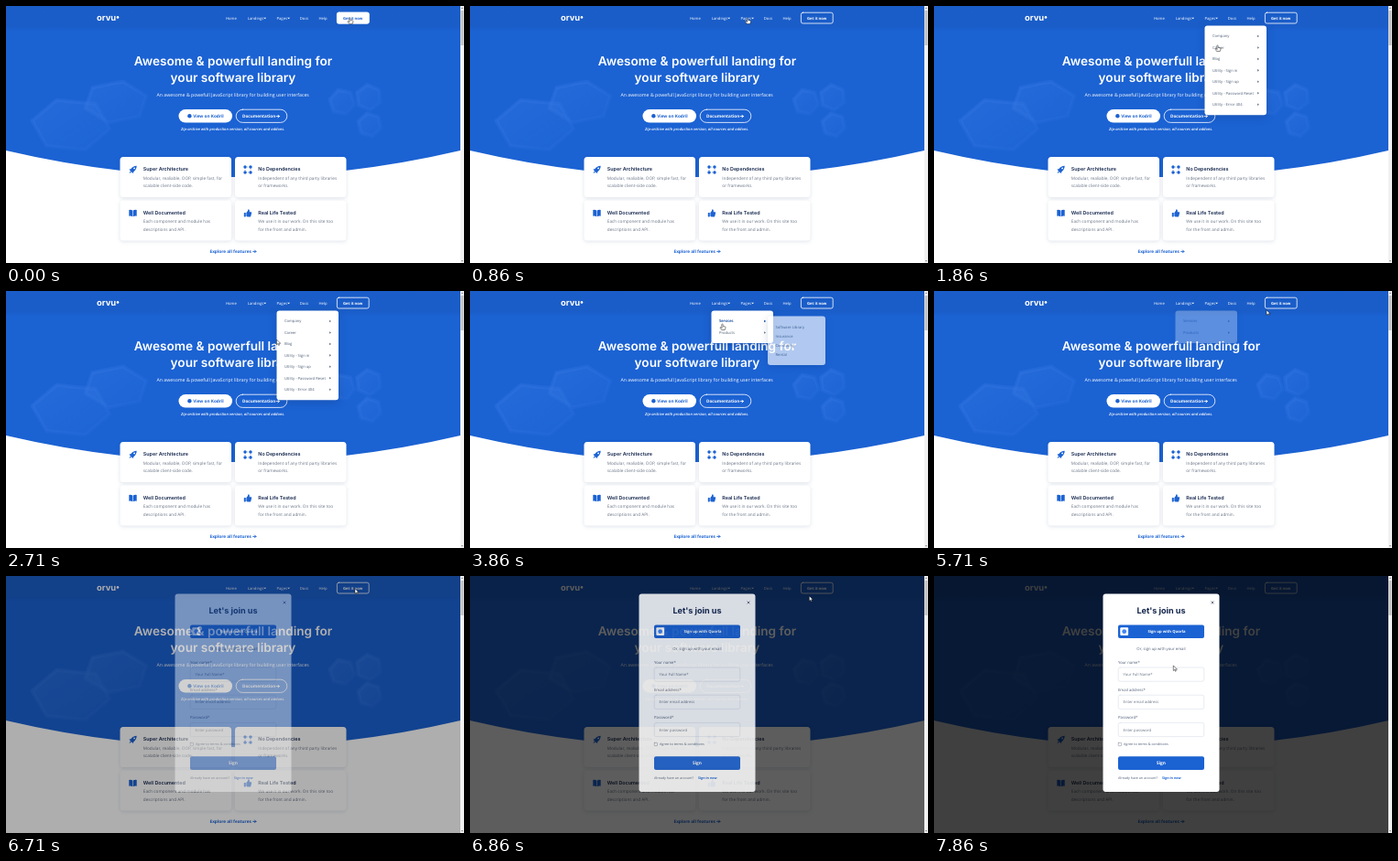
These frames come from a looping animation (500x281 px, 8 s). An HTML page:

```html
<!DOCTYPE html>
<html lang="en">
<head>
<meta charset="utf-8">
<title>Landing page tour</title>
<style>
  html, body { margin: 0; height: 100%; overflow: hidden; background: #fff; }
  svg { display: block; width: 100vw; height: 100vh; }
  text { font-family: "Open Sans", sans-serif; text-rendering: geometricPrecision; white-space: pre; }
  .head { font-family: Inter, sans-serif; font-weight: 600; }
  .bold { font-weight: 700; }
  .mid { text-anchor: middle; }
  .card { filter: drop-shadow(0 1px 2px #1b3a7026); }
  .panel { filter: drop-shadow(0 2px 4px #0b235040); }
</style>
</head>
<body>
<svg id="stage" viewBox="0 0 500 281" preserveAspectRatio="none"></svg>
<script>
const BLUE = '#1b62d3', NAVY = '#14264d', GREY = '#6a7487', MENU = '#505f78';
const LOOP = 8000, FPS = 7;

// ---------- drawing helpers (text y is the middle of the capitals) ----------
const text = (x, y, str, size, fill, cls = '', extra = '') =>
  `<text x="${x}" y="${y + size * .36}" font-size="${size}" fill="${fill}" class="${cls}" ${extra}>${str}</text>`;
const rect = (x, y, w, h, r, fill, extra = '') =>
  `<rect x="${x}" y="${y}" width="${w}" height="${h}" rx="${r}" fill="${fill}" ${extra}/>`;
const path = (d, fill, extra = '') => `<path d="${d}" fill="${fill}" ${extra}/>`;
const group = (id, body, extra = '') => `<g id="${id}" ${extra}>${body}</g>`;
const line = (color, width) => `stroke="${color}" stroke-width="${width}" stroke-linejoin="round" stroke-linecap="round"`;
const arrow = (x, y, color) => path(`M${x} ${y}h3.2m-1.4 -1.4l1.4 1.4l-1.4 1.4`, 'none', line(color, .9));

function hexagon(cx, cy, r, turn, fill, squash = 1) {
  const points = Array.from({ length: 6 }, (_, i) => {
    const a = turn + i * Math.PI / 3;
    return `${(cx + r * Math.cos(a)).toFixed(1)},${(cy + r * squash * Math.sin(a)).toFixed(1)}`;
  });
  return `<polygon points="${points.join(' ')}" fill="${fill}" ${line(fill, 4)}/>`;
}

// ---------- page ----------
function hero() {
  const deco = hexagon(71, 130, 43, .15, 'url(#shine)', .68) + hexagon(120, 105, 35, -.3, 'url(#shine)', .66) +
    hexagon(367, 105, 14, .2, 'url(#shine)') + hexagon(396, 100, 14, .4, 'url(#shine)') + hexagon(397, 130, 13, .3, 'url(#shine)');
  return path('M0 0H496V158Q248 216 0 158Z', BLUE) + `<g opacity=".55">${deco}</g>` +
    rect(0, 0, 496, 28, 0, 'url(#shade)') +
    text(99, 12.8, 'orvu', 9.4, '#fff', 'head bold') + '<circle cx="122" cy="12.4" r="1.3" fill="#fff"/>' +
    [[240, 'Home'], [263.8, 'Landings'], [295.5, 'Pages'], [320.8, 'Docs'], [341.5, 'Help']]
      .map(([x, label]) => text(x, 13, label, 4.2, '#fff')).join('') +
    [281.3, 307.2].map(x => path(`M${x} 12.7h2.8l-1.4 1.5z`, '#fff')).join('') +
    rect(361.4, 7.2, 34.8, 11.8, 2, 'none', line('#fff', .8)) + text(378.7, 13, 'Get it now', 4.2, '#fff', 'bold mid') +
    group('cta', rect(361, 6.8, 35.6, 12.6, 2.2, '#fff') + text(378.7, 13, 'Get it now', 4.2, BLUE, 'bold mid')) +
    text(248, 60, 'Awesome &amp; powerfull landing for', 13.6, '#fff', 'head mid') +
    text(248, 77.8, 'your software library', 13.6, '#fff', 'head mid') +
    text(247.7, 97.2, 'An awesome &amp; powefull JavaScript library for building user interfaces', 5.2, '#fff', 'mid') +
    rect(188.5, 113, 58.5, 14.6, 7.3, '#fff') + `<circle cx="200.4" cy="120.3" r="2.2" fill="${BLUE}"/>` +
    text(204.2, 120.4, 'View on Kodril', 4.7, BLUE, 'bold') +
    rect(251.2, 113.2, 55.6, 14.2, 7.1, 'none', line('#fff', .8)) +
    text(258, 120.4, 'Documentation', 4.65, '#fff', 'bold') + arrow(295.2, 120.6, '#fff') +
    text(247.7, 135, 'Zip-archive with production version, all sources and addons.', 4.15, '#fff', 'mid',
      'font-weight="600" font-style="italic"');
}

const icons = {
  rocket: path('M4.2 -4.2Q0 -4 -2.3 -.8L-4 -.4L-3 .9L-.9 3L.4 4L.8 2.3Q4 0 4.2 -4.2Z', BLUE) +
    path('M-2.7 1.6L-4 4L-1.6 2.7Z', BLUE) + '<circle cx="1.6" cy="-1.6" r=".9" fill="#fff"/>',
  nodes: path('M-3 -3H3V3H-3Z', 'none', `stroke="${BLUE}" stroke-width=".5" stroke-dasharray="1 1"`) +
    [[-3, -3], [3, -3], [-3, 3], [3, 3]].map(([x, y]) => `<circle cx="${x}" cy="${y}" r="1.7" fill="${BLUE}"/>`).join(''),
  book: path('M-4.2 -3.6Q-2 -4 -.3 -3V3.8Q-2 2.8 -4.2 3.2ZM4.2 -3.6Q2 -4 .3 -3V3.8Q2 2.8 4.2 3.2Z', BLUE),
  thumb: rect(-4.2, -.6, 2, 4.6, .4, BLUE) +
    path('M-1.6 -.4Q.4 -2 .4 -4.2Q2.2 -4.2 1.8 -1.2H3.8Q4.5 -.8 4 .6L3.2 3.4Q3 4 2.2 4H-.4L-1.6 3.2Z', BLUE),
};

const card = (x, y, icon, title, first, second) =>
  rect(x, y, 121.5, 44, 3.5, '#fff', 'class="card"') +
  `<g transform="translate(${x + 14} ${y + 14})">${icons[icon]}</g>` +
  text(x + 25.3, y + 13.2, title, 5.4, NAVY, 'head') +
  text(x + 25.3, y + 23, first, 4.7, GREY) + text(x + 25.3, y + 31.4, second, 4.7, GREY);

const cards = () =>
  card(124.5, 165, 'rocket', 'Super Architecture', 'Modular, realiable, OOP, simple fast, for', 'scalable client-side code.') +
  card(250, 165, 'nodes', 'No Dependencies', 'Independent of any third party libraries', 'or frameworks.') +
  card(124.5, 212.5, 'book', 'Well Documented', 'Each component and module has', 'descriptions and API.') +
  card(250, 212.5, 'thumb', 'Real Life Tested', 'We use it in our work. On this site too', 'for the front and admin.') +
  text(222.5, 268, 'Explore all features', 4.7, BLUE, 'bold') + arrow(269.7, 268.4, BLUE);

// ---------- menus ----------
const menuRow = (x, y, label, color) =>
  text(x + 8.4, y, label, 4.15, color) + path(`M${x + 57.7} ${y - 1.3}l1.7 1.3l-1.7 1.3z`, color);

const menu = (id, x, labels) => group(id,
  rect(x, 21.5, 67.5, labels.length * 12.45 + 10.5, 3, '#fff', 'class="panel"') +
  labels.map((label, i) => menuRow(x, 33 + i * 12.45, label, MENU)).join(''));

const submenu = (id, x, y, labels) => group(id,
  rect(x, y, 63, labels.length * 10.3 + 12.3, 3, '#fff', 'class="panel"') +
  labels.map((label, i) => text(x + 8.5, y + 11.6 + i * 10.3, label, 4.15, MENU)).join(''));

const menus = () =>
  menu('pages', 295.5, ['Company', 'Career', 'Blog', 'Utility - Sign in', 'Utility - Sign up',
    'Utility - Password Reset', 'Utility - Error 404']) +
  group('careerHover', menuRow(295.5, 45.45, 'Career', BLUE)) +
  submenu('careerSub', 357, 40, ['Listing', 'Opening']) +
  menu('landings', 263.5, ['Services', 'Products']) +
  group('servicesHover', menuRow(263.5, 33, 'Services', BLUE)) +
  group('productsHover', menuRow(263.5, 45.45, 'Products', BLUE)) +
  submenu('servicesSub', 325, 27.5, ['Software Library', 'Insurance', 'Consulting', 'Rental']);

// ---------- sign-up dialog ----------
const field = (y, label, hint) =>
  text(201, y, label, 4.25, MENU) +
  rect(201.2, y + 6, 93.6, 15.2, 2, '#fff', line('#d9dee7', .6)) + text(206.6, y + 13.6, hint, 4.2, GREY);

const dialog = () => group('dialog',
  rect(184.5, 19.5, 127, 216.5, 3, '#fff') +
  path('M302.9 27.9l2.2 2.2m0 -2.2l-2.2 2.2', 'none', line(NAVY, .6)) +
  text(248, 38, "Let's join us", 9.1, NAVY, 'head bold mid') +
  rect(201, 53.5, 94, 14.5, 2, BLUE) + rect(203.3, 56.3, 8.8, 8.8, 1, '#fff') +
  '<circle cx="207.7" cy="60.7" r="2.4" fill="#4285f4"/>' +
  text(254, 60.8, 'Sign up with Quorla', 4.2, '#fff', 'bold mid') +
  text(248, 79, 'Or, sign up with your email', 4.25, MENU, 'mid') +
  field(94, 'Your name*', 'Your Full Name*') + field(124.2, 'Email address*', 'Enter email address') +
  field(154.4, 'Password*', 'Enter password') +
  rect(201.2, 182.3, 3.4, 3.4, .5, '#fff', line('#7c8594', .5)) +
  text(207, 184, 'Agree to terms &amp; conditions', 3.75, MENU) +
  rect(201, 197.2, 94, 14.8, 2, BLUE) + text(248, 204.6, 'Sign', 4.8, '#fff', 'bold mid') +
  text(201, 220.6, 'Already have an account?', 3.65, MENU) + text(249, 220.6, 'Sign in now', 3.65, BLUE, 'bold'));

const scrollbar = () => rect(496, 0, 4, 281, 0, '#f1f1f1') + rect(496.5, 5, 3, 38, 0, '#c1c1c1') +
  path('M497 2.8h2l-1 -1.2zM497 278.2h2l-1 1.2z', '#555');

const pointer = () => group('cursor',
  group('arrowShape', path('M0 0V5.2L1.3 4.1L2.2 6L3 5.6L2.2 3.8H3.8Z', '#fff', line('#111', .5))) +
  group('handShape', path('M-.6 .3Q0 -.5 .6 .3V2.4L3 2.9Q3.6 3.2 3.4 4.4L2.7 6.6H-.8L-2.4 4.2Q-2.4 3.2 -1.5 3.7L-.6 4.3Z',
    '#fff', line('#111', .5))));

const stage = document.getElementById('stage');
stage.innerHTML = `<defs>
  <linearGradient id="shine" x2="1" y2="1"><stop stop-color="#4b8af0" stop-opacity=".4"/><stop offset="1" stop-color="#4b8af0" stop-opacity=".1"/></linearGradient>
  <linearGradient id="shade" x2="0" y2="1"><stop offset=".8" stop-opacity=".05"/><stop offset="1" stop-opacity="0"/></linearGradient>
</defs>` + hero() + cards() + menus() + group('backdrop', rect(0, 0, 496, 281, 0, '#000')) + dialog() + scrollbar() + pointer();

// ---------- motion ----------
const clamp = v => Math.max(0, Math.min(1, v));
// id: [fade-in start, fade-out start, duration, full opacity]
const fades = {
  pages: [860, 2750, 250, 1],
  careerHover: [1900, 2140, 140, 1],
  careerSub: [1900, 2140, 140, 1],
  landings: [3080, 5500, 300, 1],
  servicesHover: [3450, 4780, 200, 1],
  servicesSub: [3660, 4780, 300, 1],
  productsHover: [4850, 5350, 150, 1],
  cta: [6200, 6560, 140, 1],
  backdrop: [6570, 9999, 340, .75],
  dialog: [6570, 9999, 340, 1],
};
const fade = (t, [from, to, span, full]) => full * Math.min(clamp((t - from) / span), 1 - clamp((t - to) / span));

// time, x, y of the pointer tip
const route = [
  [0, 375.5, 13], [430, 345, 14], [860, 303, 13], [1290, 306, 26], [1570, 312, 33], [1857, 309.5, 43],
  [2290, 309, 45], [2714, 295.5, 53.5], [3140, 272, 14], [3430, 273, 26], [3857, 275.5, 36],
  [4400, 322, 35], [4900, 300, 44], [5300, 297, 45], [5714, 363, 21], [6000, 376, 20.5],
  [6286, 381, 14], [6714, 381, 14], [7143, 340, 45], [7714, 261, 89], [7857, 261.3, 98.3], [8000, 261.3, 98.3],
];
function pointerAt(t) {
  const i = Math.max(1, route.findIndex(key => key[0] >= t));
  const [t0, x0, y0] = route[i - 1], [t1, x1, y1] = route[i];
  const p = clamp((t - t0) / (t1 - t0)), e = p * p * (3 - 2 * p);
  return [x0 + (x1 - x0) * e, y0 + (y1 - y0) * e];
}
const isArrow = t => (t > 2500 && t < 3050) || (t > 5420 && t < 6200) || t > 6600;

const $ = id => document.getElementById(id);
const show = (id, opacity) => $(id).setAttribute('opacity', opacity);

function draw(now) {
  const t = Math.floor((now % LOOP + 5) * FPS / 1000) % (LOOP * FPS / 1000) * 1000 / FPS;
  for (const id in fades) show(id, fade(t, fades[id]));
  if (t < 300) show('cta', 1 - clamp((t - 80) / 200));
  $('cursor').setAttribute('transform', `translate(${pointerAt(t).join(' ')})`);
  show('arrowShape', +isArrow(t));
  show('handShape', +!isArrow(t));
}

let start;
function tick(now) {
  start ??= now;
  draw(now - start);
  requestAnimationFrame(tick);
}
draw(0);
requestAnimationFrame(tick);
</script>
</body>
</html>
```
